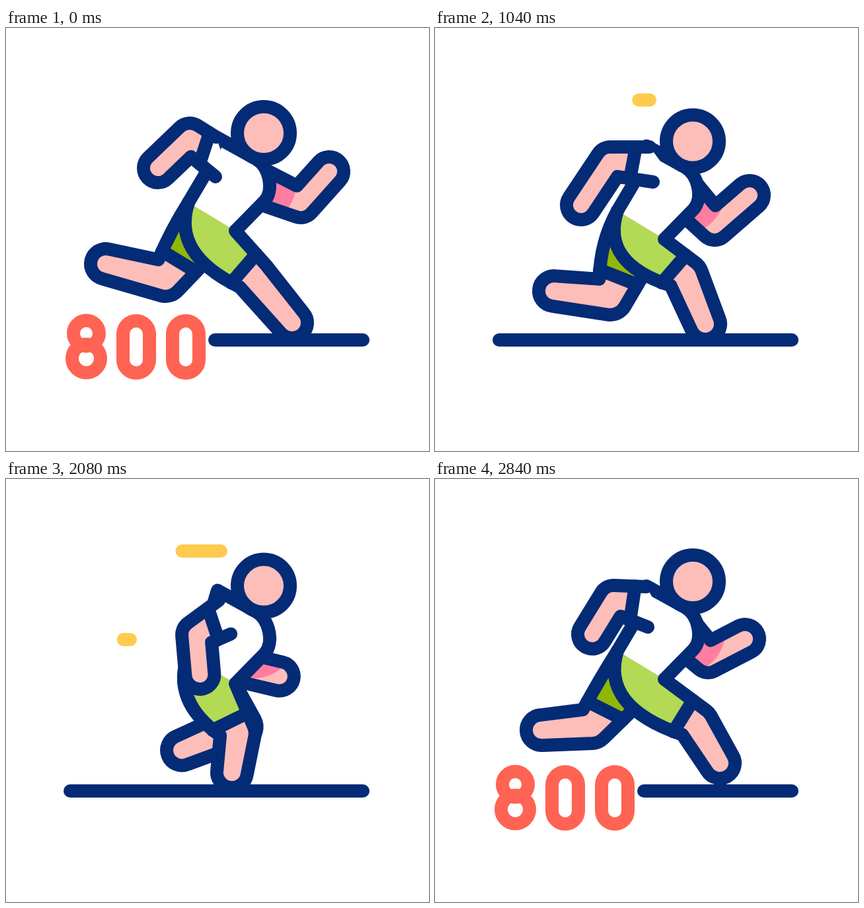
Animation of 640x640 px, one loop 2880 ms. Source, as an HTML page with a canvas:

```html
<!DOCTYPE html>
<html lang="en">
<head>
<meta charset="utf-8">
<title>800 metres runner</title>
<style>
html, body { margin: 0; width: 100%; height: 100%; overflow: hidden; background: #fff; }
canvas { display: block; width: 100vw; height: 100vh; }
</style>
</head>
<body>
<canvas id="stage" width="640" height="640"></canvas>
<script>
const ctx = document.getElementById('stage').getContext('2d');
const LOOP = 2880, STRIDE = 960, STEP = 40;
const NAVY = '#042b76', SKIN = '#fdbeb9', GREEN = '#b2da54', DARK_GREEN = '#90b707',
      PINK = '#ff7da0', YELLOW = '#ffcb4f', CORAL = '#ff6353', WHITE = '#fff';

// Stride phase in ms, vertical position of the head (repeats every half stride)
const BOB = [[0, 159], [80, 171.5], [120, 167], [220, 154], [320, 146.5], [400, 151.5], [440, 155]];

// Stride phase, knee x y, foot x y
const LEG = [
  [0, 374, 376, 433, 446], [80, 379, 376, 409, 448], [120, 371, 384, 376, 443],
  [220, 316, 384, 290, 446], [320, 253, 382, 200, 441], [400, 230, 373, 160, 407],
  [440, 237, 374, 161, 380], [480, 241, 380, 151, 357], [560, 265, 408, 180, 398],
  [600, 325, 386, 228, 403], [700, 384, 362, 322, 418], [800, 417, 338, 428, 401],
  [880, 405, 352, 422, 419], [920, 395, 371, 431, 430]
];

// Stride phase, elbow x y, hand x y, outer shoulder x y, inner shoulder x y
const ARM = [
  [0, 278, 166, 230, 212, 318, 165, 317, 225],
  [80, 265, 202, 221, 268, 325, 180, 330, 233],
  [120, 277, 220, 262, 285, 322, 180, 334, 236],
  [220, 306, 256, 338, 305, 324, 192, 352, 230],
  [320, 347, 274, 417, 281, 331, 222, 384, 218],
  [400, 385, 279, 453, 265, 340, 234, 394, 212],
  [440, 413, 271, 469, 242, 345, 243, 386, 206],
  [480, 446, 265, 489, 217, 352, 256, 380, 208],
  [560, 423, 299, 476, 253, 348, 260, 388, 225],
  [600, 390, 299, 447, 289, 340, 243, 396, 235],
  [700, 322, 262, 362, 300, 328, 200, 362, 232],
  [800, 262, 215, 271, 272, 322, 163, 330, 226],
  [880, 268, 200, 240, 263, 322, 160, 326, 222],
  [920, 270, 183, 238, 235, 320, 163, 322, 224]
];

// Row y, right end, left end, start of the front edge, start of the back edge
const WIND = [[109, 325, 99, 0, 360], [205, 179, 41, 160, 520], [243, 188, 49, 80, 440]];

const mix = (a, b, k) => a + (b - a) * k;
const mixPt = (p, q, k) => [mix(p[0], q[0], k), mix(p[1], q[1], k)];
const move = (p, dir, d) => [p[0] + dir[0] * d, p[1] + dir[1] * d];
const turn = ([x, y]) => [-y, x];
const angleOf = ([x, y]) => Math.atan2(y, x);
const polar = a => [Math.cos(a), Math.sin(a)];
const unit = (a, b) => {
  const x = b[0] - a[0], y = b[1] - a[1], d = Math.hypot(x, y) || 1;
  return [x / d, y / d];
};
const ease = (t, start, length) => {
  const k = Math.min(1, Math.max(0, (t - start) / length));
  return k * k * (3 - 2 * k);
};

// Smooth periodic curve through the rows of a table
function sample(table, time, period) {
  const t = time % period, n = table.length;
  const row = i => {
    const laps = Math.floor(i / n), r = table[i - laps * n];
    return [r[0] + laps * period, ...r.slice(1)];
  };
  let i = n - 1;
  while (table[i][0] > t) i--;
  const [a, b, c, d] = [row(i - 1), row(i), row(i + 1), row(i + 2)];
  const h = c[0] - b[0], k = (t - b[0]) / h;
  return b.slice(1).map((p, j) => {
    const q = c[j + 1];
    const m0 = (q - a[j + 1]) / (c[0] - a[0]) * h, m1 = (d[j + 1] - p) / (d[0] - b[0]) * h;
    const k2 = k * k, k3 = k2 * k;
    return (2 * k3 - 3 * k2 + 1) * p + (k3 - 2 * k2 + k) * m0 + (3 * k2 - 2 * k3) * q + (k3 - k2) * m1;
  });
}

function stroke(path, color = NAVY) {
  ctx.strokeStyle = color;
  ctx.stroke(path);
}

function fill(path, color) {
  ctx.fillStyle = color;
  ctx.fill(path);
}

function fillInside(clip, path, color) {
  ctx.save();
  ctx.clip(clip);
  fill(path, color);
  ctx.restore();
}

function polygon(...points) {
  const path = new Path2D();
  points.forEach(p => path.lineTo(...p));
  return path;
}

function bar(x1, x2, y, color) {
  stroke(polygon([x1, y], [x2, y]), color);
}

// Outline of a bent limb; side is 1 for elbows and -1 for knees
function limb(outer, inner, joint, tip, side, jointR, tipR) {
  const root = mixPt(outer, inner, 0.5);
  const toTip = unit(joint, tip), toRoot = unit(joint, root);
  const bend = turn(unit(toTip, toRoot));
  const cosine = toTip[0] * toRoot[0] + toTip[1] * toRoot[1];
  const half = Math.max(0.4, Math.sqrt((1 - cosine) / 2));
  const crook = move(joint, bend, side * jointR / half);

  const reach = Math.hypot(outer[0] - joint[0], outer[1] - joint[1]);
  const from = angleOf(unit(joint, outer)) - side * Math.acos(Math.min(1, jointR / reach));
  const normal = angleOf(turn(toTip).map(v => v * side));
  const sweep = Math.atan2(Math.sin(normal - from), Math.cos(normal - from));
  const to = sweep * side < 0 ? normal : from;

  const path = new Path2D();
  path.moveTo(...outer);
  path.arc(...joint, jointR, from, to, side > 0);
  path.arc(...tip, tipR, normal, normal + Math.PI, side > 0);
  path.lineTo(...crook);
  return { path, crook, root, toRoot, tangent: move(joint, polar(from), jointR) };
}

function drawLeg(phase, bob, shorts) {
  const [kx, ky, fx, fy] = sample(LEG, phase, STRIDE);
  const front = [347, 307 + bob], back = [276, 264 + bob];
  const { path, crook, tangent } = limb(front, back, [kx, ky], [fx, fy], -1, 26, 23);
  const seat = [250, 305 + bob + Math.max(0, crook[0] - 230) * 0.3];
  path.quadraticCurveTo(...seat, ...back);

  const hemFront = mixPt(front, tangent, 0.68);
  const hemBack = move(crook, unit(crook, seat), 14);
  const cloth = polygon(back, front, hemFront, hemBack);
  cloth.quadraticCurveTo(...seat, ...back);

  fill(path, SKIN);
  fillInside(path, cloth, shorts);
  stroke(polygon(hemFront, hemBack));
  stroke(path);
}

function drawArm(phase, bob, near) {
  const [ex, ey, hx, hy, ox, oy, ix, iy] = sample(ARM, phase, STRIDE);
  const outer = [ox, oy], inner = [ix, iy];
  const { path, crook, root, toRoot, tangent } = limb(outer, inner, [ex, ey], [hx, hy], 1, 22, 22);
  path.lineTo(...inner);
  fill(path, SKIN);
  if (near) {
    const hemOuter = mixPt(outer, tangent, 0.35), hemInner = mixPt(crook, inner, 0.35);
    fill(polygon(outer, hemOuter, hemInner, inner, move(root, toRoot, 18)), WHITE);
    stroke(polygon(hemOuter, hemInner));
  } else {
    const sleeve = new Path2D();
    sleeve.arc(375, 235 + bob, 64, 0, 7);
    if (hx > 340) fillInside(path, sleeve, PINK);
  }
  stroke(path);
}

function drawTorso(bob) {
  const path = new Path2D();
  ctx.save();
  ctx.translate(0, bob);
  path.moveTo(276, 264);
  path.lineTo(305, 215);
  path.lineTo(320, 166);
  path.lineTo(378, 198);
  path.bezierCurveTo(399, 210, 406, 246, 391, 262);
  path.lineTo(347, 307);
  fill(path, WHITE);
  stroke(path);
  ctx.restore();
}

function drawHead(y) {
  const path = new Path2D();
  path.arc(390, y, 40, 0, 7);
  fill(path, SKIN);
  stroke(path);
}

function drawDigits(k) {
  const eight = new Path2D(), x = mix(52, 121.5, k);
  eight.arc(x, 462, 19.5, 0, 7);
  eight.moveTo(x + 21.5, 500);
  eight.arc(x, 500, 21.5, 0, 7);
  stroke(eight, CORAL);
  for (const end of [197, 272]) {
    const zero = new Path2D();
    zero.roundRect(mix(52, end, k) - 20, 443, 40, 79, 20);
    stroke(zero, CORAL);
  }
}

function draw(t) {
  const phase = t % STRIDE, opposite = phase + STRIDE / 2;
  const [headY] = sample(BOB, phase, STRIDE / 2), bob = headY - 159;
  const shown = t < 1000 ? 1 - ease(t, 0, 400) : ease(t, 2160, 400);

  ctx.clearRect(0, 0, 640, 640);
  ctx.lineWidth = 20;
  ctx.lineCap = ctx.lineJoin = 'round';

  for (const [y, right, left, lead, trail] of WIND) {
    const x1 = mix(right, left, ease(phase, lead, 480));
    const x2 = mix(right, left, ease(phase, trail, 360));
    if (x2 > x1) bar(x1, x2, y, YELLOW);
  }
  bar(mix(97, 316, shown), 540, 472, NAVY);
  if (shown > 0) drawDigits(shown);

  drawArm(opposite, bob, false);
  drawLeg(opposite, bob, DARK_GREEN);
  drawTorso(bob);
  drawLeg(phase, bob, GREEN);
  drawArm(phase, bob, true);
  drawHead(headY);
}

const start = performance.now();
function tick() {
  const t = (performance.now() - start) % LOOP;
  draw(Math.floor(t / STEP) * STEP);
  requestAnimationFrame(tick);
}
tick();
</script>
</body>
</html>
```
